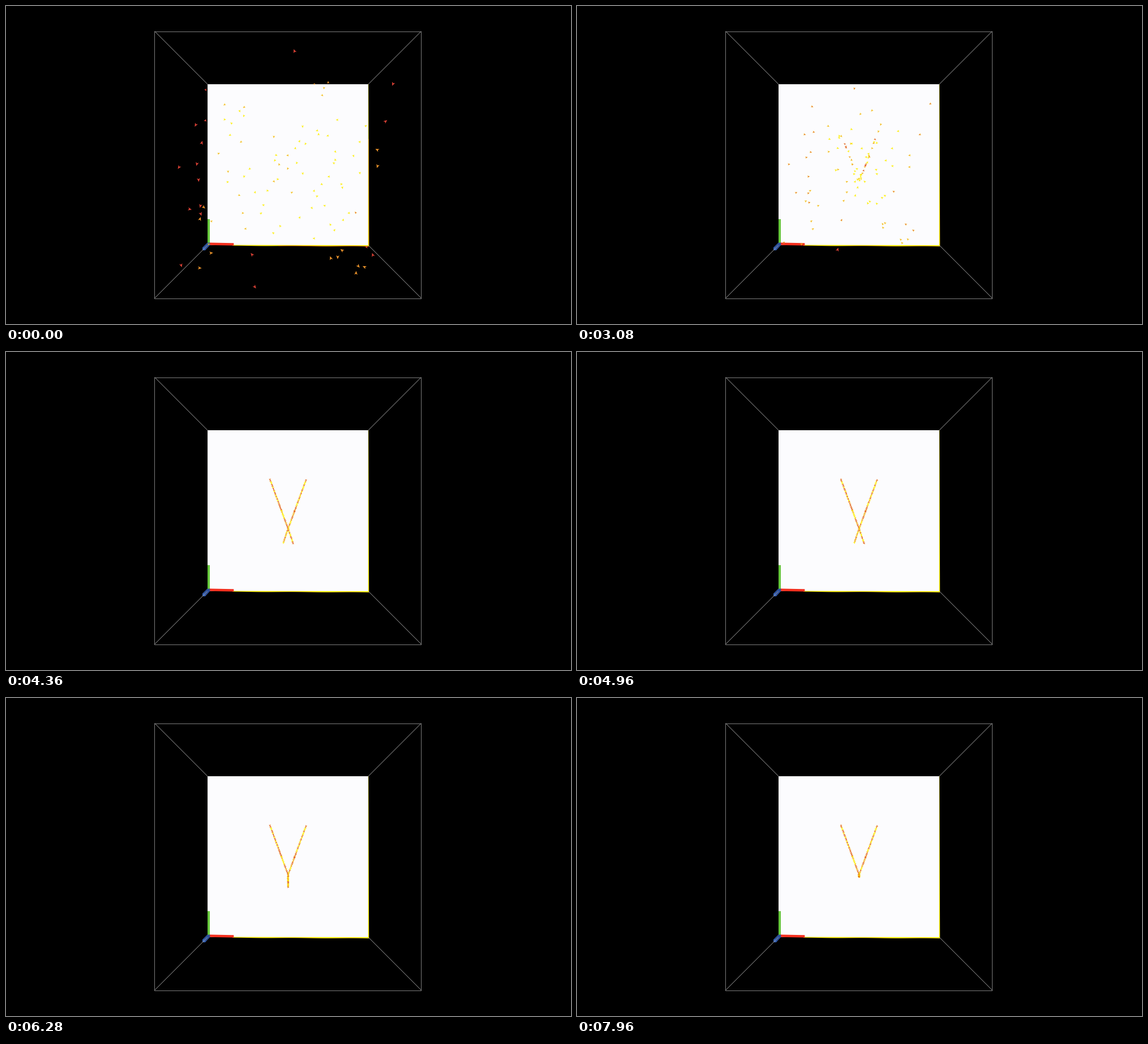
Write a matplotlib script that moves like this. It is 998x561 px and loops after 8 s.

```python
import numpy as np
import matplotlib.pyplot as plt
from matplotlib.animation import FuncAnimation
from matplotlib.collections import LineCollection, PolyCollection
from matplotlib.colors import to_rgba
from matplotlib.patches import Polygon, Rectangle

W, H, DPI = 998, 561, 64
STEP, FRAMES, START = 40, 200, 58
PX = 72 / DPI
CENTER = np.array([498.0, 280.0])
NEAR, FAR = 235.5, 142.2
INKS = np.array([to_rgba(c) for c in ("#de4236", "#f0962c", "#fff000")])
RED, ORANGE, YELLOW = range(3)

rng = np.random.default_rng(12)


def ease(t, a, b):
    s = np.clip((t - a) / (b - a), 0, 1)
    return s * s * (3 - 2 * s)


def scatter(count, x0, x1, y0, y1):
    """Evenly spread along y with jitter, random along x."""
    y = (np.arange(count) + rng.random(count)) / count
    return np.column_stack([rng.uniform(x0, x1, count), y0 + (y1 - y0) * y])


# Lone outliers near the viewer, then loose groups further back
lone = np.array([(509, 79), (683, 137), (670, 203), (305, 284),
                 (324, 358), (309, 457), (439, 495), (434, 438)]) + 0.5
swarms = [
    (RED, lone),
    (RED, scatter(8, 335, 355, 140, 395)),
    (RED, scatter(3, 610, 650, 345, 470)),
    (ORANGE, scatter(6, 335, 370, 335, 465)),
    (ORANGE, scatter(6, 560, 640, 430, 474)),
    (ORANGE, scatter(2, 645, 665, 238, 290)),
    (ORANGE, scatter(4, 520, 572, 128, 158)),
    (ORANGE, scatter(8, 370, 425, 142, 412)),
    (ORANGE, scatter(6, 470, 510, 226, 345)),
    (YELLOW, scatter(18, 385, 570, 180, 320)),
    (YELLOW, scatter(22, 540, 636, 200, 412)),
    (YELLOW, scatter(8, 428, 520, 300, 412)),
]
start = np.vstack([pts for _, pts in swarms])
ink = np.concatenate([np.full(len(pts), i) for i, pts in swarms])
N = len(start)

# Each particle gets a place on one of two crossing strokes
rank = np.argsort(np.argsort(start[:, 1] + rng.uniform(-50, 50, N)))
side = np.where(rank % 2 == 0, -1, 1)
along = rank / (N - 1)
settled_ink = rng.choice(3, N, p=[0.42, 0.28, 0.3])

rest_angle = rng.uniform(0, 2 * np.pi, N)
phase = rng.uniform(0, 2 * np.pi, N)
wobble = rng.uniform(0.2, 1.2, N)

CROSS = np.array([498.3, 311.5])
TOP, LEG, SPREAD = 225, 26, 32


def targets(t, side, along):
    """Places on the strokes; the lower legs close up, then shorten."""
    spread = 8.8 * (1 - ease(t, 5000, 6200))
    length = LEG - 4 * ease(t, 5000, 6200) - 18 * ease(t, 6300, 7200)
    y = TOP + along * (CROSS[1] + LEG - TOP)
    upper = (CROSS[1] - y) / (CROSS[1] - TOP)
    lower = (y - CROSS[1]) / LEG
    on_leg = y > CROSS[1]
    x = CROSS[0] + side * np.where(on_leg, -spread * lower, SPREAD * upper)
    return np.column_stack([x, np.where(on_leg, CROSS[1] + length * lower, y)])


SPEED, ACCEL = 2.4, 0.065
offset = start - targets(0, side, along)
gap = np.hypot(*offset.T)
away = offset / gap[:, None]
heading = np.arctan2(-away[:, 1], -away[:, 0])
arrival = (np.sqrt(SPEED ** 2 + 4 * ACCEL * gap) - SPEED) / (2 * ACCEL)


def swarm(frame):
    """Positions, angles and how far each particle has settled (0 to 1)."""
    n = max(0, frame - START)
    if n == 0:
        return start, rest_angle, np.zeros(N)
    late = np.maximum(n - arrival, 0)
    overshoot = (SPEED + 2 * ACCEL * arrival) * late * np.exp(-late / 1.4)
    left = np.where(late > 0, -overshoot, gap - SPEED * n - ACCEL * n * n)
    pos = targets(frame * STEP, side, along) + away * left[:, None]
    settled = np.minimum(late / 5, 1)
    return pos, heading + settled * wobble * np.sin(0.25 * n + phase), settled


ARROW = np.array([(0.55, 0), (-0.45, 0.42), (-0.2, 0), (-0.45, -0.42)])


def arrows(pos, angle, size):
    c, s = np.cos(angle)[:, None], np.sin(angle)[:, None]
    x, y = ARROW.T
    shape = np.stack([c * x - s * y, s * x + c * y], axis=-1)
    return pos[:, None] + shape * size[:, None, None]


fig = plt.figure(figsize=(W / DPI, H / DPI), dpi=DPI, facecolor="black")
ax = fig.add_axes([0, 0, 1, 1])
ax.set_xlim(0, W)
ax.set_ylim(H, 0)
ax.axis("off")


def fill(points, color):
    ax.add_patch(Polygon(points, color=color, lw=0))


# Wire box and back wall
corners = np.array([(-1, -1), (1, -1), (1, 1), (-1, 1)])
front = CENTER + NEAR * corners
back = CENTER + FAR * corners
ax.add_collection(LineCollection([np.vstack([front, front[:1]])],
                                 colors="#7c7c7c", linewidths=PX))
ax.add_collection(LineCollection(list(np.stack([front, back], axis=1)),
                                 colors="#949494", linewidths=0.8 * PX))
left, top = back[0]
right, bottom = back[2]
ax.add_patch(Rectangle(back[0], 2 * FAR, 2 * FAR, color="#fcfcfe", lw=0))

# Bright rim on the right and bottom of the wall
fill([(right - 0.4, top), (right, top), (right + 1, bottom + 1),
      (right - 0.6, bottom + 1)], "#f8ee00")
rim_x = np.linspace(400, right + 0.8, 60)
rim_y = 422.9 + 1.2 * (rim_x - 400) / 240 + 0.25 * np.sin(rim_x / 17)
fill(np.vstack([[(400, 421.5), (right + 0.8, 422)],
                np.column_stack([rim_x, rim_y])[::-1]]), "#fff000")
rim_red, = ax.plot(rim_x[20:], rim_y[20:], color="#b03a10", lw=0.8 * PX)
side_red, = ax.plot([right + 0.5, right + 0.8], [235, bottom],
                    color="#e08a10", lw=0.7 * PX)

# Axis markers
fill([(left, 376), (360.3, 376), (360.3, 419), (left, 419)], "#66c83c")
fill([(359, 417.4), (402.3, 418.3), (402.3, 422.6), (359, 421.8)], "#f5301f")
fill([(355.5, 417.6), (360.3, 417.6), (360.3, 421.8), (352, 431),
      (347, 431), (347, 426)], "#2d509c")
fill([(347, 426), (352, 426), (352, 431), (347, 431)], "#3563b8")

# A few particles sit on the strokes from the first move on
pair = np.array([-1, -1, 1, 1])
early_pos = targets(0, pair, np.linspace(0.48, 0.5, 4))
early = PolyCollection(
    arrows(early_pos, np.arange(4) * 1.6 + 0.4, np.full(4, 4.0)),
    facecolors=INKS[[YELLOW, ORANGE, RED, RED]], linewidths=0, zorder=4)
flock = PolyCollection([], zorder=5)
ax.add_collection(early)
ax.add_collection(flock)


def draw(frame):
    pos, angle, settled = swarm(frame)
    out = np.maximum(np.abs(pos - CENTER).max(axis=1) - FAR, 0)
    face = INKS[ink] + settled[:, None] * (INKS[settled_ink] - INKS[ink])
    edge = np.tile(INKS[YELLOW], (N, 1))
    edge[:, 3] = np.where(out > 0, 0, 0.8 - 0.4 * settled)
    flock.set_verts(arrows(pos, angle, np.clip(3.8 + 0.4 * out, 0, 6.6)))
    flock.set_facecolor(face)
    flock.set_edgecolor(edge)
    flock.set_linewidth(0.35 * PX)
    early.set_visible(frame > START)
    fade = 1 - ease(frame * STEP, 2400, 3400)
    rim_red.set_alpha(0.15 + 0.7 * fade)
    side_red.set_alpha(fade)
    return flock, early, rim_red, side_red


anim = FuncAnimation(fig, draw, frames=FRAMES, interval=STEP, repeat=True,
                     repeat_delay=0, init_func=lambda: draw(0), blit=False)
plt.show()
```
